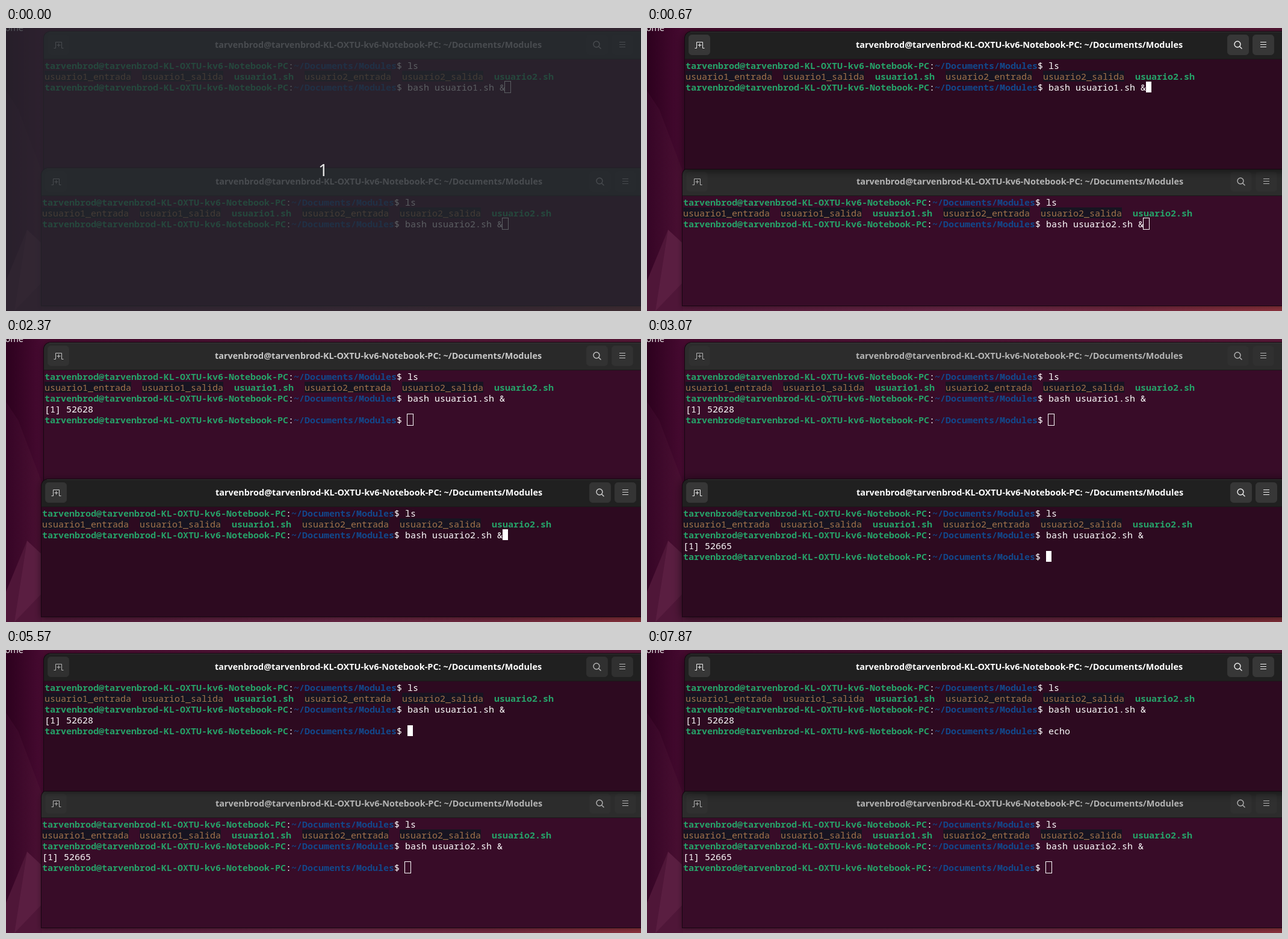
Animation of 1055x470 px, one loop 8 s. Source, as an HTML page with a canvas:

```html
<!DOCTYPE html>
<html lang="es">
<head>
<meta charset="utf-8">
<style>
html, body { margin: 0; width: 100%; height: 100%; overflow: hidden; background: #45102f; }
canvas { display: block; }
</style>
</head>
<body>
<canvas id="stage" width="1055" height="470"></canvas>
<script>
const W = 1055, H = 470, LOOP = 8000, COL = 9, ROW = 18;
const ctx = document.getElementById('stage').getContext('2d');
const USER = 'tarvenbrod', HOST = USER + '-KL-OXTU-kv6-Notebook-PC', DIR = '~/Documents/Modules';
const PROMPT_COLS = USER.length + HOST.length + DIR.length + 4;
const MONO = '15px "Noto Sans Mono", monospace';
const TITLE = 'bold 14.45px "Noto Sans", sans-serif';
const GREEN = '#26a269', BLUE = '#12488b', WHITE = '#ffffff', BROWN = '#a2734c';

const FILES = [[0, 'usuario1_entrada'], [18, 'usuario1_salida'], [35, 'usuario1.sh'],
               [48, 'usuario2_entrada'], [66, 'usuario2_salida'], [83, 'usuario2.sh']];
const KEYS = [[6800, 'e'], [7070, 'c'], [7170, 'h'], [7230, 'o'], [7300, ' ']];

// Times in ms; focus and hidden are lists of [from, to].
const first = {
  left: 62, top: 5, bottom: 235, textX: 64, titleX: 618.5, searchX: 982, menuX: 1024,
  command: 'bash usuario1.sh &', job: '[1] 52628', enter: 1170, done: 1200, keys: KEYS,
  focus: [[470, 2270], [5570, LOOP]],
  hidden: [[1070, 1170], [1770, 2270], [6170, 6770], [7870, LOOP]]
};
const second = {
  left: 58, top: 232, bottom: 462, textX: 60, titleX: 619.5, searchX: 987, menuX: 1029,
  command: 'bash usuario2.sh &', job: '[1] 52665', enter: 3030, done: 3070, keys: [],
  focus: [[2270, 4335]],
  hidden: [[2870, 3030], [3630, 4230]]
};

const within = (spans, t) => spans.some(([from, to]) => t >= from && t < to);
const mix = (a, b, k) => `rgb(${a.map((v, i) => Math.round(v + (b[i] - v) * k))})`;
const gray = (a, b, k) => mix([a, a, a], [b, b, b], k);

// Title bar: 1 while focused, easing out to 0 after focus is lost.
function glow(win, t) {
  if (within(win.focus, t)) return 1;
  const lost = win.focus.map(f => f[1]).filter(end => end <= t).pop();
  return lost === undefined ? 0 : Math.max(0, 1 - (t - lost) / 210) ** 2;
}

// Buttons and shadow also fade in.
function fade(win, t) {
  const span = win.focus.find(([from, to]) => t >= from && t < to);
  return span ? Math.min(1, (t - span[0]) / 200) : glow(win, t);
}

function polygon(color, ...points) {
  ctx.fillStyle = color;
  ctx.beginPath();
  points.forEach(([x, y]) => ctx.lineTo(x, y));
  ctx.fill();
}

function gradient(x0, x1, ...colors) {
  const g = ctx.createLinearGradient(x0, 0, x1, 0);
  colors.forEach((c, i) => g.addColorStop(i / (colors.length - 1), c));
  return g;
}

function label(text, x, y, font, color, align = 'left') {
  ctx.font = font;
  ctx.fillStyle = color;
  ctx.textAlign = align;
  ctx.fillText(text, x, y);
}

function wallpaper() {
  ctx.fillStyle = gradient(0, W, '#460a2e', '#501536', '#5a1838');
  ctx.fillRect(0, 0, W, H);
  polygon(gradient(0, 62, '#2d011e', '#470a31'), [0, 0], [62, 0], [62, 245], [20, 135], [0, 105]);
  polygon(gradient(0, 62, '#360526', '#4b1033'), [0, 105], [20, 135], [62, 245], [62, 360], [35, 335], [0, 420]);
  polygon('#4f1638', [0, 420], [35, 335], [62, 360], [62, 470], [0, 470]);
  polygon('#5a1e41', [35, 335], [62, 360], [62, 420], [14, 470]);
  ctx.fillStyle = gradient(60, W, '#53193a', '#5f2040', '#6b2747', '#73283f', '#8c323d');
  ctx.fillRect(60, 455, W, 15);
  label('Home', 29, 5, '14.5px "Noto Sans", sans-serif', '#eeeeee', 'right');
}

function button(x, y, k) {
  ctx.beginPath();
  ctx.roundRect(x - 17.5, y - 16.5, 35, 33, 5);
  ctx.fillStyle = gray(48, 55, k);
  ctx.strokeStyle = gray(46, 54, k);
  ctx.fill();
  ctx.stroke();
}

function strokePath(d, x, y, color) {
  ctx.save();
  ctx.translate(x, y);
  ctx.strokeStyle = color;
  ctx.stroke(new Path2D(d));
  ctx.restore();
}

function titleBar(win, t) {
  const y = win.top + 23, tabX = win.left + 25, k = fade(win, t);
  const ink = gray(180, 240, k);
  [tabX, win.searchX, win.menuX].forEach(x => button(x, y, k));
  strokePath('M-8 5H-5V-5H5V5H8M-3 0H3M0 -3V3', tabX + .5, y + .5, ink);
  ctx.lineWidth = 1.4;
  strokePath('M4 -1A5 5 0 1 1 -6 -1A5 5 0 1 1 4 -1M2.7 2.7L6.5 6.5', win.searchX, y, ink);
  ctx.lineWidth = 1;
  strokePath('M-5 -4.5H5M-5 -.5H5M-5 3.5H5', win.menuX, y, ink);
  label(`${USER}@${HOST}: ${DIR}`, win.titleX, y + 5, TITLE, gray(180, 255, glow(win, t)), 'center');
}

function terminal(win, t) {
  const rowY = row => win.top + 48 + row * ROW;
  const put = (col, row, text, color, bold) =>
    label(text, win.textX + col * COL, rowY(row) + 15, (bold ? 'bold ' : '') + MONO, color);
  const prompt = (row, command) => {
    const id = `${USER}@${HOST}`;
    put(0, row, id, GREEN, true);
    put(id.length, row, ':', WHITE);
    put(id.length + 1, row, DIR, BLUE, true);
    put(PROMPT_COLS - 2, row, '$ ' + command, WHITE);
  };

  prompt(0, 'ls');
  for (const [col, name] of FILES) {
    const script = name.endsWith('.sh');
    if (!script) {
      ctx.fillStyle = '#171421';
      ctx.fillRect(win.textX + col * COL, rowY(1), name.length * COL, ROW);
    }
    put(col, 1, name, script ? GREEN : BROWN, script);
  }
  prompt(2, win.command);

  let col = PROMPT_COLS + win.command.length, row = 2;
  if (t >= win.enter) {
    col = 0;
    row = 3;
  }
  if (t >= win.done) {
    const typed = win.keys.filter(([at]) => t >= at).map(key => key[1]).join('');
    put(0, 3, win.job, WHITE);
    prompt(4, typed);
    col = PROMPT_COLS + typed.length;
    row = 4;
  }

  const x = win.textX + col * COL, y = rowY(row);
  if (!within(win.focus, t)) {
    ctx.strokeStyle = WHITE;
    ctx.strokeRect(x - .5, y - .5, COL + 1, ROW + 1);
  } else if (!within(win.hidden, t)) {
    ctx.fillStyle = WHITE;
    ctx.fillRect(x, y, COL, ROW);
  }
}

function drawWindow(win, t) {
  const k = glow(win, t), shade = fade(win, t), { left, top, bottom } = win;
  ctx.save();
  ctx.beginPath();
  ctx.roundRect(left, top, W, bottom - top, [12, 12, 0, 0]);
  ctx.save();
  ctx.shadowColor = `rgba(0,0,0,${.35 + .25 * shade})`;
  ctx.shadowBlur = 8 + 8 * shade;
  ctx.shadowOffsetY = 2;
  ctx.fillStyle = '#160711';
  ctx.fill();
  ctx.restore();
  ctx.clip();
  ctx.fillStyle = within(win.focus, t) ? '#2d0a20' : '#380c28';
  ctx.fillRect(left + 1, top + 46, W, bottom - top - 47);
  ctx.fillStyle = gray(44, 32, k);
  ctx.beginPath();
  ctx.roundRect(left + 1, top + 1, W, 45, [11, 11, 0, 0]);
  ctx.fill();
  ctx.fillStyle = gray(57, 48, k);
  ctx.fillRect(left + 10, top + 1, W, 1);
  ctx.fillStyle = '#191919';
  ctx.fillRect(left + 1, top + 46, W, 1);
  titleBar(win, t);
  terminal(win, t);
  ctx.restore();
}

function countdown() {
  ctx.fillStyle = 'rgba(36,41,46,.75)';
  ctx.fillRect(0, 0, W, H);
  label('1', 527, 246, '28px "Noto Sans", sans-serif', '#e4e4e4', 'center');
}

function draw(t) {
  const firstInFront = within(first.focus, t);
  wallpaper();
  (firstInFront ? [second, first] : [first, second]).forEach(win => drawWindow(win, t));
  if (t < 30) countdown();
}

const start = performance.now();
function tick() {
  draw((performance.now() - start) % LOOP);
  requestAnimationFrame(tick);
}
tick();
</script>
</body>
</html>
```
